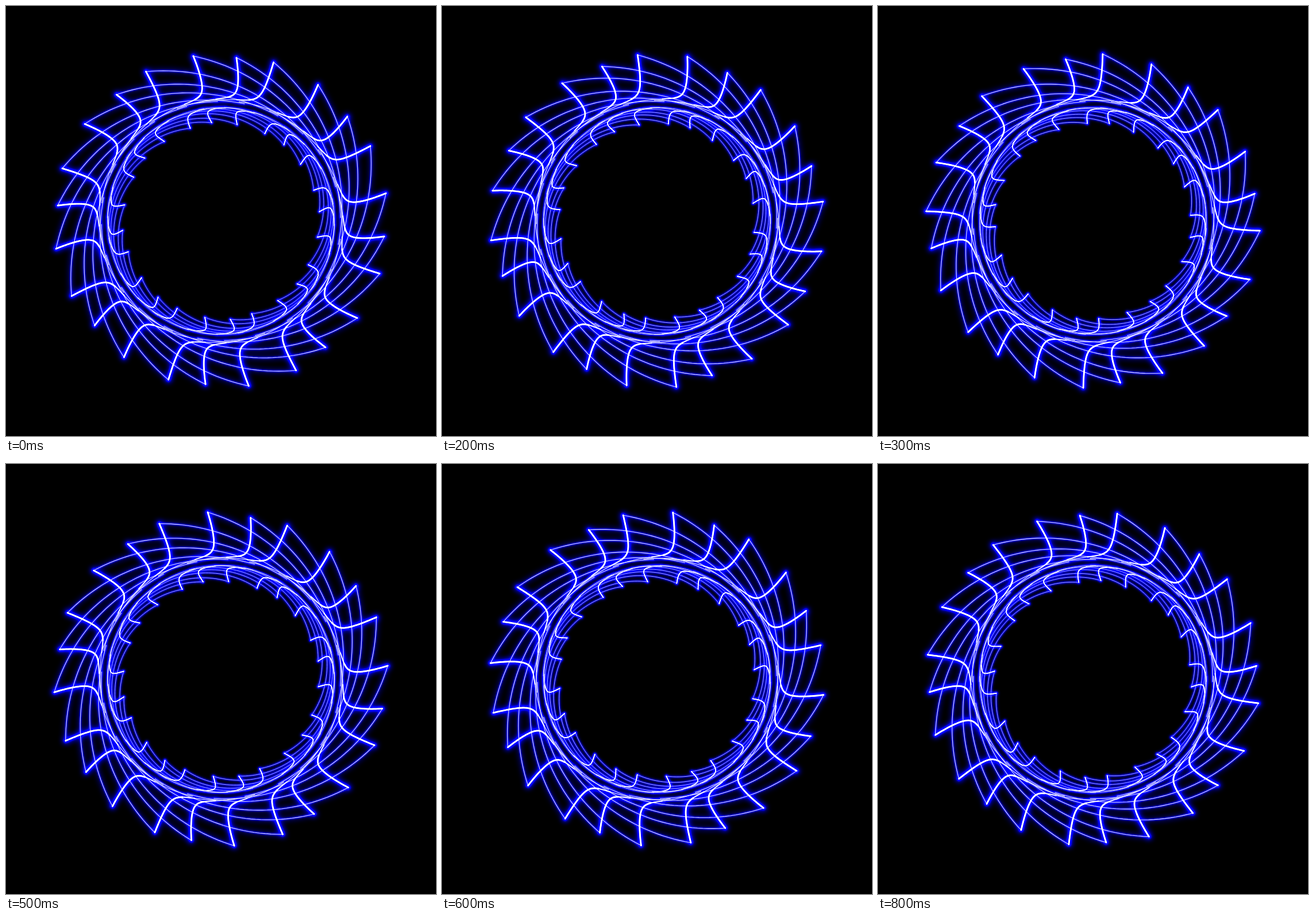
These frames come from a looping animation (748 px wide and 748 px high, 900 ms). An HTML page with a canvas:

```html
<!DOCTYPE html>
<html lang="en">
<head>
<meta charset="utf-8">
<title>Neon saw ring</title>
<style>
  html, body { margin: 0; height: 100%; background: #000; overflow: hidden; }
  canvas { display: block; width: 100vw; height: 100vh; }
</style>
</head>
<body>
<canvas id="stage" width="748" height="748"></canvas>
<script>
const SIZE = 748, STEP_MS = 100, STEPS = 9, STEP_DEG = 10;
const ctx = document.getElementById('stage').getContext('2d');
const rad = deg => deg * Math.PI / 180;

// Three kinds of teeth repeat every 45 degrees.
const TEETH = [
  { angle: -9.55, height: 83, lean: 4.4 },
  { angle: 5.4, height: 77.3, lean: 4.5 },
  { angle: 18.33, height: 82.8, lean: 1.2 }
];
const SWEEP = 83;

// The inner ring is the outer one mirrored, squeezed and turned inward.
const RINGS = [
  { base: 208, gain: 1, dir: 1, thin: 1.35, bold: 2.9, glow: 1 },
  { base: 198, gain: -0.34, dir: -1, thin: 0.8, bold: 1.9, glow: 0.55 }
];

function trace(path, ring, count, pointAt) {
  for (let i = 0; i <= count; i++) {
    const [deg, lift] = pointAt(i / count);
    const a = rad(deg) * ring.dir;
    const r = ring.base + ring.gain * lift;
    path[i ? 'lineTo' : 'moveTo'](r * Math.sin(a), -r * Math.cos(a));
  }
}

function eachTooth(draw) {
  for (let sector = 0; sector < 8; sector++)
    for (const t of TEETH) draw(t, t.angle + sector * 45);
}

// Long arcs falling from each tip onto the ring.
function buildArcs(ring) {
  const path = new Path2D();
  eachTooth((t, deg) => trace(path, ring, 44, u =>
    [deg + u * SWEEP, t.height * (1 - u) ** 2]));
  return path;
}

// Steep edges that bend over and run along the ring, cut at a given height.
function buildEdges(ring, lowest) {
  const path = new Path2D();
  eachTooth((t, deg) => trace(path, ring, 60, u => {
    const h = lowest ** u;
    return [deg + t.lean * (1 - h) - 0.7 * (1 / h - 1), t.height * h];
  }));
  return path;
}

for (const ring of RINGS) {
  ring.arcs = buildArcs(ring);
  ring.tails = buildEdges(ring, 0.022);
  ring.bends = buildEdges(ring, 0.055);
  ring.edges = buildEdges(ring, 0.1);
}

function stroke(path, width, color, blur = 0) {
  ctx.filter = blur ? `blur(${blur}px)` : 'none';
  ctx.lineWidth = width;
  ctx.strokeStyle = color;
  ctx.stroke(path);
}

function drawRing(ring, turn) {
  const { arcs, tails, bends, edges, thin, bold, glow } = ring;
  ctx.save();
  ctx.translate(SIZE / 2, SIZE / 2);
  ctx.rotate(rad(turn * ring.dir));
  ctx.lineCap = ctx.lineJoin = 'round';
  ctx.globalCompositeOperation = 'lighter';
  stroke(arcs, 7 * glow, 'rgba(0,0,255,.5)', 5 * glow);
  stroke(bends, 11 * glow, 'rgba(0,0,255,.9)', 5 * glow);
  stroke(arcs, thin + 2, 'rgba(0,0,255,.8)', 1);
  stroke(tails, thin + 2, 'rgba(0,0,255,.8)', 1);
  stroke(edges, bold + 4 * glow, '#00f', 1.5 * glow);
  ctx.globalCompositeOperation = 'source-over';
  stroke(arcs, thin, 'rgba(215,215,255,.9)');
  stroke(tails, thin, 'rgba(225,225,255,.95)');
  stroke(bends, (thin + bold) / 2, '#f4f4ff');
  stroke(edges, bold, '#fff');
  ctx.restore();
}

let shown = -1;
function frame(now) {
  const step = Math.floor(now / STEP_MS) % STEPS;
  if (step !== shown) {
    shown = step;
    ctx.fillStyle = '#000';
    ctx.fillRect(0, 0, SIZE, SIZE);
    for (const ring of RINGS) drawRing(ring, step * STEP_DEG);
  }
  requestAnimationFrame(() => frame(performance.now() - start));
}
const start = performance.now();
frame(0);
</script>
</body>
</html>
```
